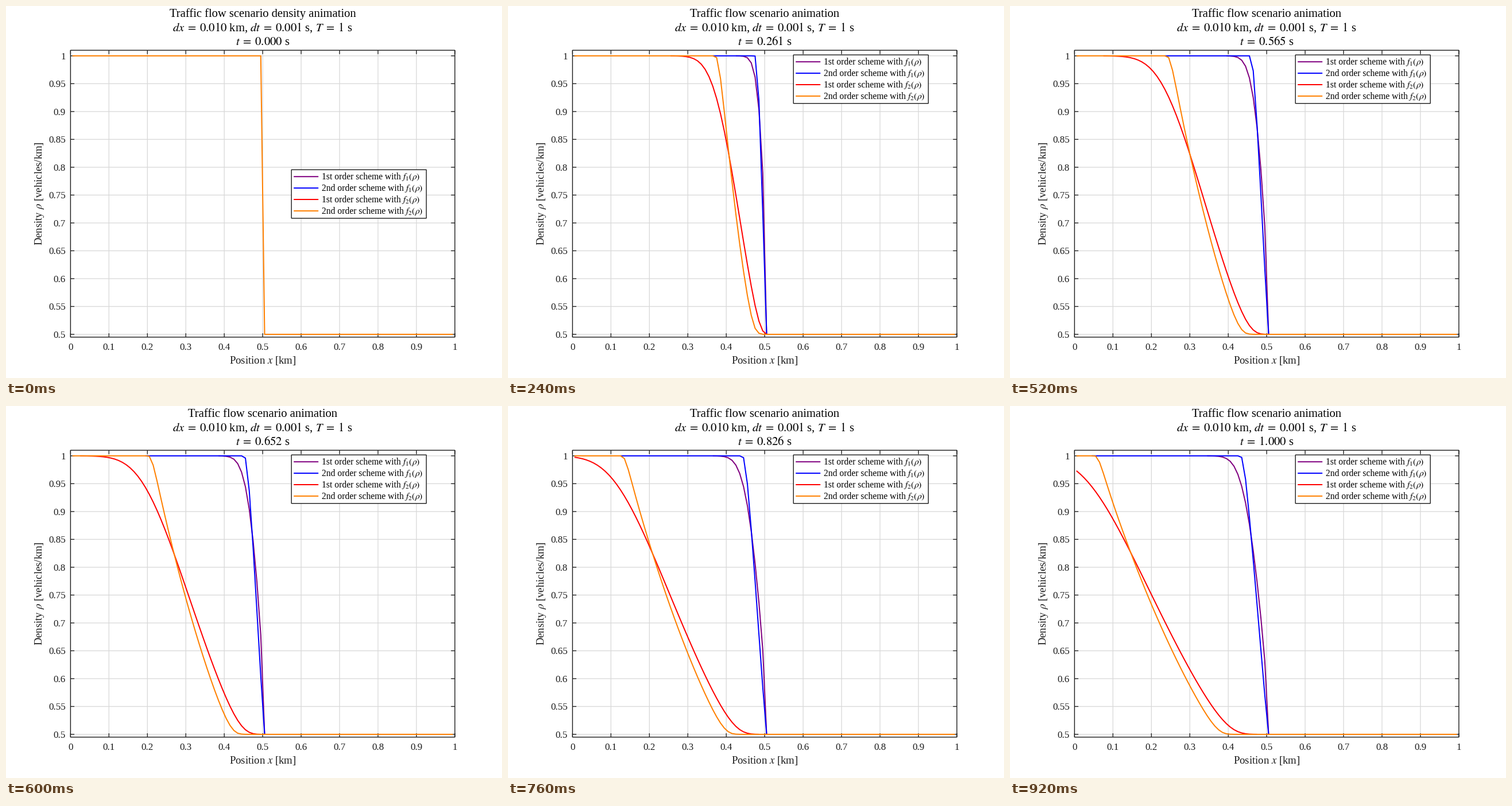
A matplotlib script for the animation above (0.96 s loop, 864x648 px).

```python
import matplotlib.pyplot as plt
import numpy as np
from matplotlib.animation import FuncAnimation
from matplotlib.patches import Rectangle

W, H, DPI = 864, 648, 72          # 72 dpi: one point is one pixel
FRAMES, INTERVAL = 24, 40
CELLS, STEPS = 100, 1000
DX, DT = 1 / CELLS, 1 / STEPS

LEFT, RIGHT, TOP, BOTTOM = 112.4, 781.9, 77.1, 576.8
Y_MIN, Y_MAX = 0.495, 1.01
BOX_X, BOX_W, BOX_H = 497.2, 235, 84.5
INK, GRID = "#1a1a1a", "#d9d9d9"
TICK, LABEL, TITLE, LEGEND = 17, 18.7, 20.57, 15.6
EQ = r"\hspace{0.26}=\hspace{0.26}"

plt.rcParams["font.family"] = "Liberation Serif"
plt.rcParams["mathtext.fontset"] = "stix"


# --- traffic model -------------------------------------------------------

def flux1(rho):
    return 200 / 3600 * rho * (1 - rho)


def flux2(rho):
    return -rho * np.log10(rho)


def limited_slope(rho):
    """Monotonized central slope of each cell."""
    d = np.diff(np.pad(rho, 1, mode="edge"))
    back, fwd = d[:-1], d[1:]
    size = np.minimum(2 * np.minimum(abs(back), abs(fwd)), abs(back + fwd) / 2)
    return np.where(back * fwd > 0, np.sign(back) * size, 0)


def rate(rho, flux, order):
    # All waves run to the left, so each face takes the state on its right.
    face = rho - limited_slope(rho) / 2 if order == 2 else rho
    f = flux(np.append(face, rho[-1]))
    return (f[:-1] - f[1:]) / DX


def solve(flux, order):
    rho = np.where(X < 0.5, 1.0, 0.5)
    history = [rho]
    for _ in range(STEPS):
        rho = rho + DT * rate(rho, flux, order)
        history.append(rho)
    return history


X = (np.arange(CELLS) + 0.5) * DX
SCHEMES = [
    ("1st", 1, flux1, (0.5, 0, 0.5)),
    ("2nd", 1, flux1, (0, 0, 1)),
    ("1st", 2, flux2, (1, 0, 0)),
    ("2nd", 2, flux2, (1, 0.5, 0)),
]
runs = [solve(flux, int(name[0])) for name, _, flux, _ in SCHEMES]


# --- drawing -------------------------------------------------------------

def to_x(x):
    return LEFT + x * (RIGHT - LEFT)


def to_y(rho):
    return BOTTOM - (rho - Y_MIN) / (Y_MAX - Y_MIN) * (BOTTOM - TOP)


def visible(rho, above):
    """Blank the stretches covered by a curve above, so no fringe shows."""
    shown = rho.copy()
    for other in above:
        same = np.pad(abs(rho - other) < 1e-4, 1, constant_values=True)
        shown[same[:-2] & same[1:-1] & same[2:]] = np.nan
    return shown


def box(x, y, w, h):
    return [x / W, 1 - (y + h) / H, w / W, h / H]


def pixel_axes(x, y, w, h):
    ax = fig.add_axes(box(x, y, w, h))
    ax.set(xlim=(0, w), ylim=(h, 0))
    ax.axis("off")
    return ax


def segment(ax, xs, ys, color, width, z):
    return ax.plot(xs, ys, color=color, lw=width, zorder=z, snap=False,
                   solid_capstyle="butt", solid_joinstyle="round")[0]


def label(ax, x, y, text, size, ha="center", color=INK, **kw):
    return ax.text(x, y, text, size=size, ha=ha, va="baseline", color=color, **kw)


def draw_frame(ax):
    tick = 6.7
    for i in range(11):
        x = to_x(i / 10)
        y = to_y(0.5 + i / 20)
        if 0 < i < 10:
            segment(ax, [x, x], [TOP, BOTTOM], GRID, 1.3, 1)
        segment(ax, [LEFT, RIGHT], [y, y], GRID, 1.3, 1)
        for edge, step in ((TOP, tick), (BOTTOM, -tick)):
            segment(ax, [x, x], [edge, edge + step], INK, 1.3, 2)
        for edge, step in ((LEFT, tick), (RIGHT, -tick)):
            segment(ax, [edge, edge + step], [y, y], INK, 1.3, 2)
        label(ax, x, 599.4, f"{i / 10:g}", TICK)
        label(ax, 104, y + 5.8, f"{0.5 + i / 20:g}", TICK, ha="right")
    ax.add_patch(Rectangle((LEFT, TOP), RIGHT - LEFT, BOTTOM - TOP,
                           fill=False, ec=INK, lw=1.4, zorder=2, snap=False))
    label(ax, (LEFT + RIGHT) / 2, 623, r"Position $x$ [km]", LABEL)
    label(ax, 63, (TOP + BOTTOM) / 2, r"Density $\rho$ [vehicles/km]", LABEL,
          rotation=90, rotation_mode="anchor")


def draw_legend(ax):
    ax.add_patch(Rectangle((0, 0), BOX_W, BOX_H, fc="white", ec=INK, lw=1.4,
                           clip_on=False, snap=False))
    for i, (name, flux_no, _, color) in enumerate(SCHEMES):
        y = 12 + 19.9 * i
        segment(ax, [4, 47], [y, y], color, 2, 3)
        label(ax, 52.3, y + 4.9, f"{name} order scheme with", LEGEND, ha="left",
              color="black")
        end = 224 if name == "1st" else 229
        label(ax, end, y + 4.9, rf"$f_{flux_no}(\rho)$", LEGEND, ha="right",
              color="black")


fig = plt.figure(figsize=(W / DPI, H / DPI), dpi=DPI, facecolor="white")
stage = pixel_axes(0, 0, W, H)
legend = pixel_axes(BOX_X, 85.2, BOX_W, BOX_H)
draw_frame(stage)
draw_legend(legend)

curves = [segment(stage, [], [], color, 2, 4) for *_, color in SCHEMES]
mid = (LEFT + RIGHT) / 2
heading = label(stage, mid, 18.9, "", TITLE, color="black")
label(stage, mid, 43.4,
      rf"$dx{EQ}0.010$ km, $dt{EQ}0.001$ s, $T{EQ}1$ s", TITLE, color="black")
clock = label(stage, mid, 68.2, "", TITLE, color="black")


def update(frame):
    step = round(STEPS * frame / (FRAMES - 1))
    states = [run[step] for run in runs]
    for i, curve in enumerate(curves):
        curve.set_data(to_x(X), to_y(visible(states[i], states[i + 1:])))
    kind = "animation" if frame else "density animation"
    heading.set_text(f"Traffic flow scenario {kind}")
    clock.set_text(rf"$t{EQ}{step * DT:.3f}$ s")
    legend.set_position(box(BOX_X, 85.2 if frame else 285.2, BOX_W, BOX_H))
    return [*curves, heading, clock]


anim = FuncAnimation(fig, update, frames=FRAMES, interval=INTERVAL,
                     repeat=True, repeat_delay=0, blit=False)
plt.show()
```
